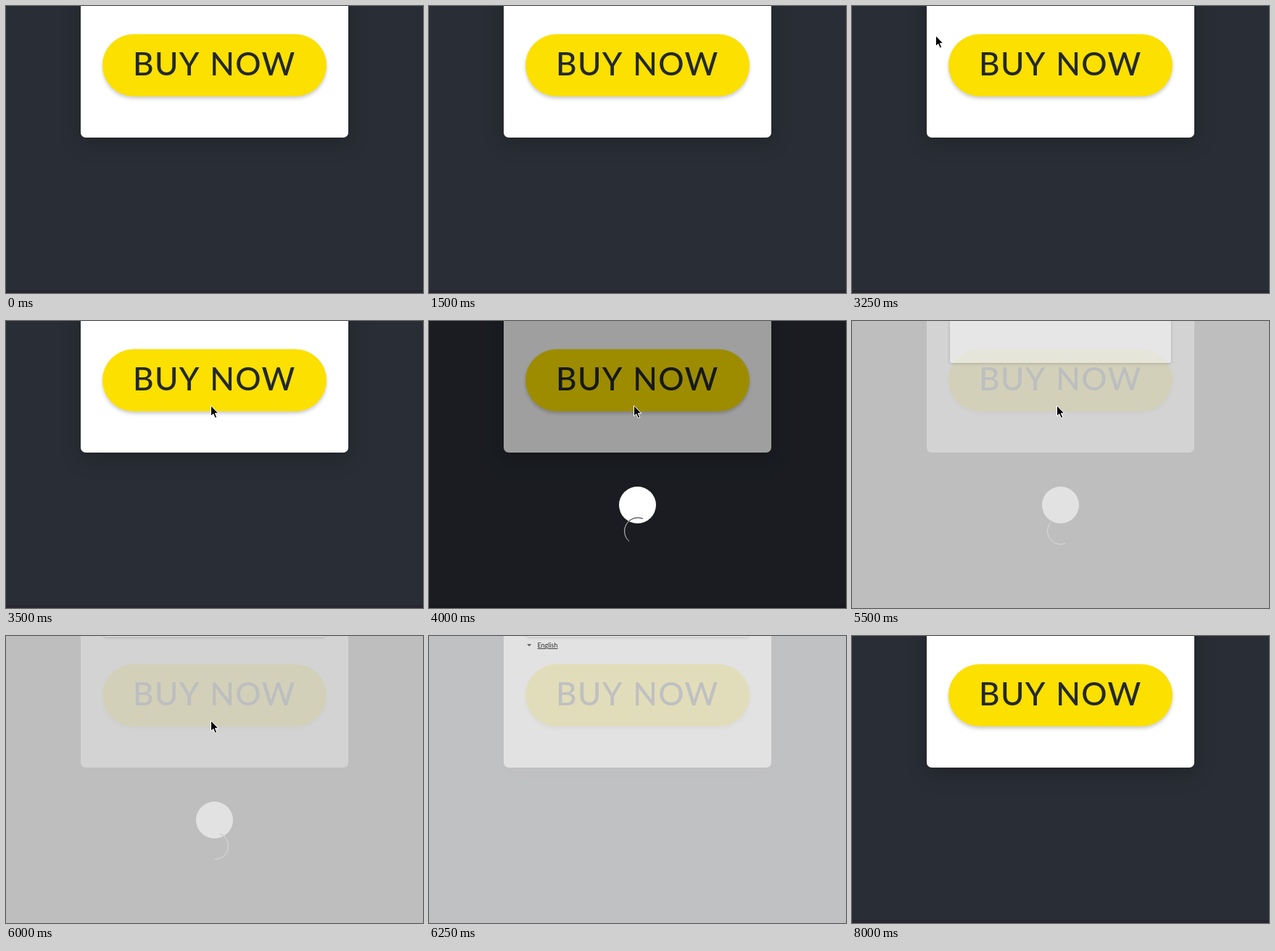
These frames come from a looping animation (575 px wide and 397 px high, 8500 ms). An HTML page:

```html
<!DOCTYPE html>
<html lang="en">
<head>
<meta charset="utf-8">
<title>Buy now</title>
<style>
  html, body { margin: 0; width: 100%; height: 100%; overflow: hidden; background: #292d35; }
  svg { display: block; width: 575px; height: 397px; }
  .label { font: 500 44px Lato, "Open Sans", sans-serif; letter-spacing: 1.4px; fill: #23282f; }
  .lang { font: 9px Lato, "Open Sans", sans-serif; fill: #333; }
  .card { filter: drop-shadow(0 7px 14px rgba(0, 0, 0, .22)); }
  .button { filter: drop-shadow(0 3px 2.5px rgba(0, 0, 0, .2)); }
  .sheet { filter: drop-shadow(0 1px 2px rgba(0, 0, 0, .4)); }
  #sheet { opacity: .45; }
  #arc { mix-blend-mode: difference; }
</style>
</head>
<body>
<svg viewBox="0 0 575 397">
  <rect width="575" height="397" fill="#292d35"/>
  <rect y="393" width="575" height="4" fill="#282631"/>
  <rect class="card" x="103" y="-40" width="369" height="222" rx="7" fill="#fff"/>
  <rect class="button" x="133" y="39" width="309" height="86" rx="43" fill="#fbe000"/>
  <text class="label" y="96.4"><tspan x="175">BUY</tspan> <tspan x="281.2">NOW</tspan></text>

  <g id="loader">
    <rect width="575" height="397" fill="#000" fill-opacity=".375"/>
    <circle cx="287.5" cy="254.5" r="25.5" fill="#fff"/>
    <path id="arc" fill="none" stroke="#fff" stroke-width=".9"/>
  </g>

  <rect id="veil" width="575" height="397" fill="#ddd" fill-opacity=".845"/>
  <g id="sheet">
    <rect class="sheet" x="135" y="-60" width="305" height="60" rx="3" fill="#fff"/>
  </g>
  <g id="lang">
    <path d="M135.2 11.3h6l-3 3z" fill="#555"/>
    <text class="lang" x="149.5" y="16" text-decoration="underline">English</text>
  </g>

  <path id="cursor" d="M0 0V14.6L3.4 11.6L5.8 17.2L8.2 16.2L5.9 10.7H10.4Z"
        fill="#000" stroke="#fff" stroke-width="1" stroke-linejoin="round"/>
</svg>
<script>
const LOOP = 8500, TICK = 250;
const RING = { x: 288, y: 290.5, r: 18.5, start: 130, sweep: 162, turn: 110 };

// [time, x, y] of the pointer tip; no position means hidden
const POINTER = [
  [0], [250, 185.5, 55.5], [500, 258.5, 98.5], [750, 295.5, 90.5],
  [1000, 48.5, 45.5], [1250, 121.5, 81.5], [1500],
  [3250, 115.5, 41], [3500, 282.5, 117], [6250]
];
// [time, lower edge] of the sliding sheet
const SHEET = [[0], [5500, 58], [5750, 1], [8000]];

const el = id => document.getElementById(id);
const [loader, arc, veil, sheet, lang, cursor] =
  ["loader", "arc", "veil", "sheet", "lang", "cursor"].map(el);

const stepAt = (table, t) => table.filter(row => row[0] <= t).pop();
const show = (node, on) => node.setAttribute("display", on ? "inline" : "none");
const between = (t, a, b) => t >= a && t < b;

function place(node, x, y) {
  show(node, y !== undefined);
  if (y !== undefined) node.setAttribute("transform", `translate(${x} ${y})`);
}

function ringPoint(deg) {
  const a = deg * Math.PI / 180;
  return `${RING.x + RING.r * Math.cos(a)} ${RING.y + RING.r * Math.sin(a)}`;
}

function drawArc(t) {
  const a = RING.start + RING.turn * Math.floor((t - 4000) / TICK);
  arc.setAttribute("d",
    `M${ringPoint(a)}A${RING.r} ${RING.r} 0 0 1 ${ringPoint(a + RING.sweep)}`);
}

function draw(t) {
  const [, x, y] = stepAt(POINTER, t);
  place(cursor, x, y);
  place(sheet, 0, stepAt(SHEET, t)[1]);
  show(loader, between(t, 4000, 6250));
  show(veil, between(t, 5500, 8000));
  show(lang, between(t, 6250, 8000));
  drawArc(t);
}

const begin = performance.now();
function frame() {
  draw((performance.now() - begin) % LOOP);
  requestAnimationFrame(frame);
}
frame();
</script>
</body>
</html>
```
